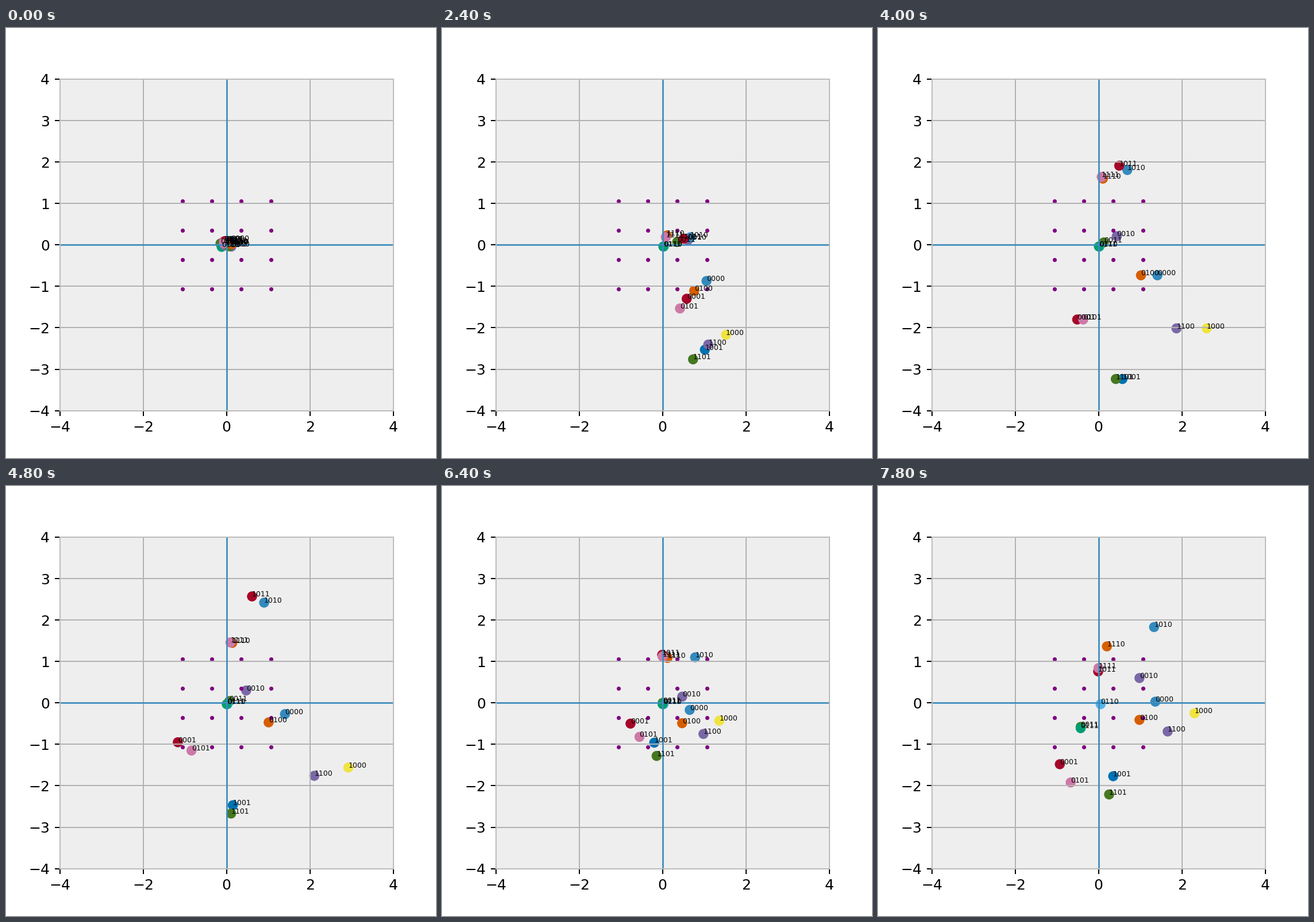
Write a matplotlib script that moves like this. It is 748 px wide and 748 px high and loops after 8000 ms.

```python
import numpy as np
import matplotlib.pyplot as plt
from matplotlib.animation import FuncAnimation

SIZE, DPI = 748, 180
FRAMES, INTERVAL = 40, 200
CODES = [f"{i:04b}" for i in range(16)]
CYCLE = ["#348ABD", "#A60628", "#7A68A6", "#467821", "#D55E00",
         "#CC79A7", "#56B4E9", "#009E73", "#F0E442", "#0072B2"]

# Key points (x + yj) of the free codes; the other codes follow from these.
KEYS = [8, 16, 24, 28, 32, 39]
PATHS = {
    "0000": [.85-.48j, .77-.86j, 1.40-.27j, 1.51-.29j, .65-.17j, 1.36+.03j],
    "0001": [.51-.18j, .38-1.82j, -1.17-.95j, -.25-.49j, -.77-.50j, -.93-1.48j],
    "0010": [.74+.17j, .20+.02j, .47+.30j, .81+.11j, .47+.15j, .98+.60j],
    "1000": [1.27-1.80j, 1.07-1.54j, 2.92-1.56j, 2.86-1.27j, 1.36-.43j, 2.30-.25j],
    "1001": [.83-1.38j, .73-2.51j, .15-2.47j, 1.04-2.27j, -.20-.96j, .35-1.77j],
    "1010": [.86-.08j, .16+.36j, .90+2.42j, 1.30+.84j, .78+1.10j, 1.33+1.83j],
    "1011": [.63-.14j, .15+.37j, .61+2.57j, .43+.83j, -.01+1.16j, -.01+.76j],
}
DROP = [-.56, .20, -.20, -.30, -.32, -.44]

rng = np.random.default_rng(4)
CLUSTER = rng.uniform(-.17, .12, 16) + 1j * rng.uniform(-.07, .1, 16)


def second_bit(code, z, drop):
    """Where a point goes when the second bit of its code turns to 1."""
    if code[2] == "0":
        return complex(.72 * z.real, z.imag + drop)
    if code[0] == "1":
        return complex(.15 * z.real, 1.5 * np.tanh(z.imag / 1.2))
    return complex(.05 * z.real, -.03)


def swell(t):
    """The cloud widens for a moment between two key times."""
    ends = [0] + KEYS
    phase = np.interp(t, ends, range(len(ends)))
    return 1 + .3 * np.sin(np.pi * phase) ** 2


def points_at(t):
    at = {code: np.interp(t, KEYS, path) for code, path in PATHS.items()}
    at["0011"] = at["0010"] * max(0, 1 - t / 28)
    drop = np.interp(t, KEYS, DROP)
    for code in list(at):
        at[code[0] + "1" + code[2:]] = second_bit(code, at[code], drop)
    slip = np.interp(t, [32, 39], [0, 1]) * (-.43 - .58j)
    at["0011"] += slip
    at["0111"] += slip

    z = np.array([at[code] for code in CODES])
    z = CLUSTER + (z * swell(t) - CLUSTER) * min(1, t / 8)
    return np.column_stack([z.real, z.imag])


plt.rcParams["font.family"] = "DejaVu Sans"
fig = plt.figure(figsize=(SIZE / DPI, SIZE / DPI), dpi=DPI, facecolor="white")
box = np.array([93.6, 82.4, 580.3, 576.6]) / SIZE
ax = fig.add_axes(box, facecolor="#eeeeee")
ax.set(xlim=(-4, 4), ylim=(-4, 4),
       xticks=range(-4, 5, 2), yticks=range(-4, 5))
ax.grid(color="#b2b2b2", lw=0.8)
for spine in ax.spines.values():
    spine.set_color("#bcbcbc")
ax.axhline(0, color=CYCLE[0], lw=1)
ax.axvline(0, color=CYCLE[0], lw=1)

colors = [CYCLE[i % len(CYCLE)] for i in range(16)]
dots = ax.scatter(*points_at(0).T, s=36, c=colors, linewidths=1, zorder=1)
levels = np.array([-3, -1, 1, 3]) / np.sqrt(8)
gx, gy = np.meshgrid(levels, levels)
ax.scatter(gx, gy, s=3.4, color="purple", linewidths=1, zorder=1)
labels = [ax.text(0, 0, code, fontsize=5, color="black") for code in CODES]


def update(frame):
    pts = points_at(frame)
    dots.set_offsets(pts)
    for label, xy in zip(labels, pts):
        label.set_position(xy)
    return [dots, *labels]


anim = FuncAnimation(fig, update, frames=FRAMES, interval=INTERVAL,
                     repeat=True, repeat_delay=0, blit=False)
plt.show()
```
